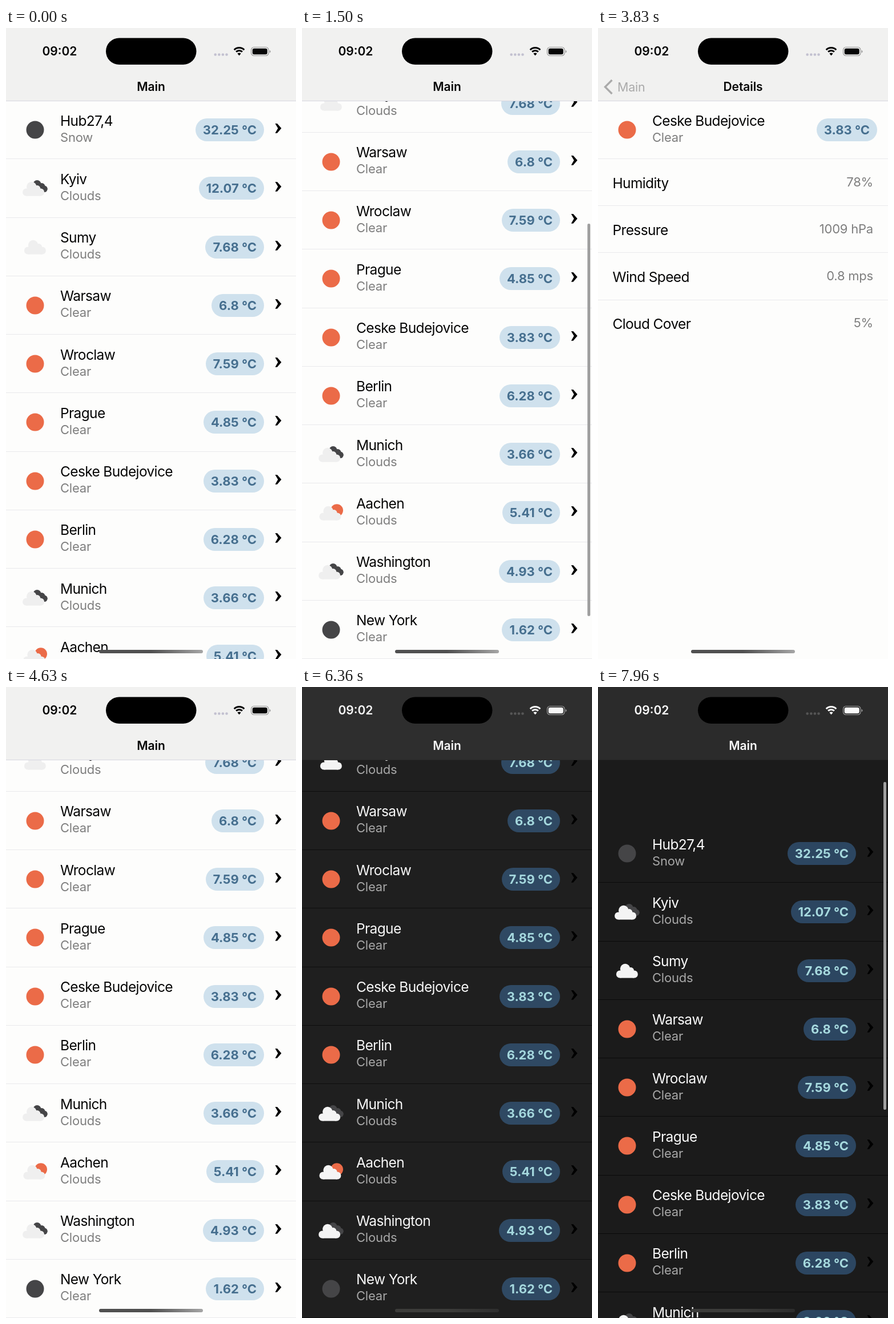
Recreate the animation shown at these times as an HTML page. Size 508x1103 px, loop 8000 ms.

```html
<!DOCTYPE html>
<html lang="en">
<head>
<meta charset="utf-8">
<title>Weather list</title>
<style>
/* --scroll: list offset, --push: details page progress, --dark: theme progress */
@property --scroll { syntax: "<number>"; inherits: true; initial-value: 0; }
@property --push { syntax: "<number>"; inherits: true; initial-value: 0; }
@property --dark { syntax: "<number>"; inherits: true; initial-value: 0; }

html, body { margin: 0; width: 100%; height: 100%; overflow: hidden; }

#stage {
  --mix: calc(var(--dark) * 100%);
  --page: color-mix(in srgb, #1b1b1b var(--mix), #fdfdfc);
  --head: color-mix(in srgb, #2b2b2b var(--mix), #f1f1f0);
  --edge: color-mix(in srgb, #242424 var(--mix), #d6d6e0);
  --line: color-mix(in srgb, #0a0a0a var(--mix), #e9e9ec);
  --text: color-mix(in srgb, #fafafa var(--mix), #060606);
  --soft: color-mix(in srgb, #a8a8a8 var(--mix), #7e7e7e);
  --pill: color-mix(in srgb, #2c4661 var(--mix), #cfe1ed);
  --temp: color-mix(in srgb, #a6d9de var(--mix), #466f8f);
  --cloud: color-mix(in srgb, #f4f4f4 var(--mix), #efefef);
  --dots: color-mix(in srgb, #555 var(--mix), #c3c1d0);
  --home1: color-mix(in srgb, #3c3c3a var(--mix), #505050);
  --home2: color-mix(in srgb, #2c2c2c var(--mix), #a6a6a6);
  position: relative; width: 508px; height: 1103px; overflow: hidden;
  background: var(--page); color: var(--text);
  font-family: Inter, "Liberation Sans", sans-serif;
  animation: scroll 8s infinite, push 8s infinite, dark 8s infinite;
}
#stage * { box-sizing: border-box; }
#view { position: absolute; inset: 127px 0 0; overflow: hidden; }
.page { position: absolute; inset: 0; background: var(--page); }
#main { transform: translateX(calc(var(--push) * -30%)); }
#details { transform: translateX(calc((1 - var(--push)) * 100%)); }
#list { transform: translateY(calc(var(--scroll) * -1px)); }

.row { position: absolute; left: 0; width: 508px; height: 102.25px; border-bottom: 1px solid var(--line); }
.row svg { position: absolute; left: 0; top: 0; }
/* Zero line height puts the middle of the capitals on "top" */
.name, .sub, .title, .back, .time { position: absolute; line-height: 0; white-space: nowrap; }
.name { left: 95px; top: 34.5px; font-size: 24.5px; letter-spacing: -.026em; }
.sub { left: 95px; top: 63.5px; font-size: 22px; letter-spacing: -.01em; color: var(--soft); }
.pill {
  position: absolute; right: 56px; top: 31px; height: 40px; padding: 0 13px; border-radius: 20px;
  background: var(--pill); color: var(--temp); font: 700 22px/40px Inter, "Liberation Sans", sans-serif; white-space: nowrap;
}
#details .pill { right: 19px; }
.fact { height: 82.1px; }
.fact:last-child { border: 0; }
.fact .name { left: 25.5px; top: 41.5px; }
.fact .sub { left: auto; right: 26px; top: 39.5px; }

#bar {
  position: absolute; left: 500px; width: 4.5px; border-radius: 2.2px; background: #a0a0a0;
  top: calc(39px + clamp(0, var(--scroll), 251) * .701px + max(0, var(--scroll) - 251) * 1px);
  height: calc(686px - max(0, 0 - var(--scroll)) * 1px - max(0, var(--scroll) - 251) * 1px);
  animation: bar 8s infinite linear;
}

#head { position: absolute; inset: 0 0 auto; height: 128px; background: var(--head); border-bottom: 1px solid var(--edge); }
#head svg { position: absolute; left: 0; top: 0; }
.time { left: 63.5px; top: 41px; font-size: 21px; font-weight: 600; }
.title { left: 0; width: 508px; top: 103px; text-align: center; font-size: 21px; font-weight: 600; letter-spacing: -.005em; }
.title.from { transform: translateX(calc(var(--push) * -190px)); opacity: calc(1 - var(--push)); }
.title.to { transform: translateX(calc((1 - var(--push)) * 220px)); opacity: var(--push); }
.back { left: 34px; top: 103px; font-size: 21.5px; letter-spacing: -.01em; opacity: var(--push); animation: press 8s infinite step-end; }
#head .back svg { left: -34px; top: -103px; overflow: visible; }
#home { position: absolute; left: 163px; top: 1087px; width: 182px; height: 6px; border-radius: 3px; background: linear-gradient(90deg, var(--home1) 50%, var(--home2)); }

@keyframes scroll {
  0% { --scroll: 0; }
  6.1% { --scroll: 0; animation-timing-function: cubic-bezier(.4, .1, .8, .8); }
  10.4% { --scroll: 251; animation-timing-function: cubic-bezier(.2, .6, .5, 1); }
  12% { --scroll: 292; animation-timing-function: cubic-bezier(.35, .2, .2, 1); }
  18.75%, 82.6% { --scroll: 251; animation-timing-function: cubic-bezier(.3, .2, .5, 1); }
  86.25% { --scroll: 310; animation-timing-function: cubic-bezier(.35, .2, .3, .97); }
  90.375% { --scroll: 254; animation-timing-function: ease-out; }
  93.75% { --scroll: 251; }
  95.8% { --scroll: 251; animation-timing-function: cubic-bezier(.4, .1, .7, .8); }
  99.5%, 100% { --scroll: -113; }
}
@keyframes push {
  0%, 24.25% { --push: 0; animation-timing-function: cubic-bezier(.38, .7, .125, 1); }
  32.5% { --push: 1; }
  49.5% { --push: 1; animation-timing-function: cubic-bezier(.38, .7, .125, 1); }
  57.75%, 100% { --push: 0; }
}
@keyframes dark {
  0%, 71.99% { --dark: 0; animation-timing-function: step-end; }
  72% { --dark: .085; animation-timing-function: cubic-bezier(.3, .2, .25, 1); }
  81.25%, 100% { --dark: 1; }
}
@keyframes bar {
  0%, 6.2% { opacity: 0; }
  7%, 22.875% { opacity: 1; }
  25%, 82.8% { opacity: 0; }
  84%, 100% { opacity: 1; }
}
@keyframes press {
  0%, 100% { color: var(--text); }
  47.875% { color: #aaa; }
  60% { color: var(--text); }
}
</style>
</head>
<body>
<div id="stage">
  <div id="view">
    <div id="main" class="page"><div id="list"></div><div id="bar"></div></div>
    <div id="details" class="page"></div>
  </div>
  <div id="head">
    <svg width="508" height="70">
      <rect x="175" y="17.5" width="158.5" height="46.5" rx="23.2"/>
      <g fill="var(--dots)">
        <circle cx="366.7" cy="46.5" r="2.3"/><circle cx="373.3" cy="46.5" r="2.3"/>
        <circle cx="379.9" cy="46.5" r="2.3"/><circle cx="386.5" cy="46.5" r="2.3"/>
      </g>
      <g fill="none" stroke="var(--text)" stroke-width="3">
        <path d="M399.7 38.2A12.5 12.5 0 0 1 417.3 38.2M403.1 41.6A7.7 7.7 0 0 1 413.9 41.6"/>
      </g>
      <path d="M408.5 48.3L405.4 44.8A4.2 4.2 0 0 1 411.6 44.8Z" fill="var(--text)"/>
      <rect x="429.5" y="33.5" width="30.5" height="15" rx="5" fill="none" stroke="#999" stroke-width="1.2"/>
      <rect x="431.7" y="35.7" width="26" height="10.6" rx="3.2" fill="var(--text)"/>
      <path d="M461.6 38.8q2 .6 2 2.3t-2 2.3z" fill="#999"/>
    </svg>
    <div class="time">09:02</div>
    <div class="title from">Main</div>
    <div class="title to">Details</div>
    <div class="back">
      <svg width="40" height="120"><path d="M24.5 91L12.5 103L24.5 115" fill="none" stroke="currentColor" stroke-width="3.4"/></svg>Main
    </div>
  </div>
  <div id="home"></div>
</div>
<script>
const circle = (x, y, r, fill) => `<circle cx="${x}" cy="${y}" r="${r}" fill="${fill}"/>`;

const cloud = (dx = 0, dy = 0) => `<g fill="var(--cloud)" transform="translate(${dx} ${dy})">
  <circle cx="44.8" cy="48.6" r="8.8"/><circle cx="35.7" cy="58" r="6.6"/>
  <circle cx="54.6" cy="51.6" r="5.6"/><circle cx="60.5" cy="58" r="6.6"/>
  <rect x="35.7" y="53" width="24.8" height="11.6"/></g>`;

const DARK = "#454547", SUN = "#eb6b48";
const icons = {
  moon: circle(51, 51, 15.5, DARK),
  sun: circle(51, 51, 15.5, SUN),
  cloud: cloud(2.8, -1),
  clouds: circle(54.5, 44, 7, DARK) + circle(62.5, 48, 6, DARK) + circle(67, 52.3, 5.8, DARK) + cloud(),
  partly: circle(61, 47.2, 11, SUN) + cloud(1.3, 0)
};
const chevron = '<path d="M471.5 40h3.6l7.3 8.2-7.3 8.6h-3.6l4.9-8.6z" fill="#000"/>';

const cities = [
  ["Hub27,4", "Snow", "32.25", "moon"],
  ["Kyiv", "Clouds", "12.07", "clouds"],
  ["Sumy", "Clouds", "7.68", "cloud"],
  ["Warsaw", "Clear", "6.8", "sun"],
  ["Wroclaw", "Clear", "7.59", "sun"],
  ["Prague", "Clear", "4.85", "sun"],
  ["Ceske Budejovice", "Clear", "3.83", "sun"],
  ["Berlin", "Clear", "6.28", "sun"],
  ["Munich", "Clouds", "3.66", "clouds"],
  ["Aachen", "Clouds", "5.41", "partly"],
  ["Washington", "Clouds", "4.93", "clouds"],
  ["New York", "Clear", "1.62", "moon"]
];
const facts = [["Humidity", "78%"], ["Pressure", "1009 hPa"], ["Wind Speed", "0.8 mps"], ["Cloud Cover", "5%"]];
const ROW = 102.25, FACT = 82.1;

const labels = (name, sub) => `<div class="name">${name}</div><div class="sub">${sub}</div>`;
const cityRow = ([name, sky, temp, icon], top, extra = "") =>
  `<div class="row" style="top:${top}px"><svg width="508" height="102">${icons[icon]}${extra}</svg>
  ${labels(name, sky)}<div class="pill">${temp} °C</div></div>`;
const factRow = ([name, value], i) =>
  `<div class="row fact" style="top:${ROW + i * FACT}px">${labels(name, value)}</div>`;

document.getElementById("list").innerHTML =
  cities.map((city, i) => cityRow(city, i * ROW, chevron)).join("");
document.getElementById("details").innerHTML =
  cityRow(cities[6], 0) + facts.map(factRow).join("");
</script>
</body>
</html>
```
